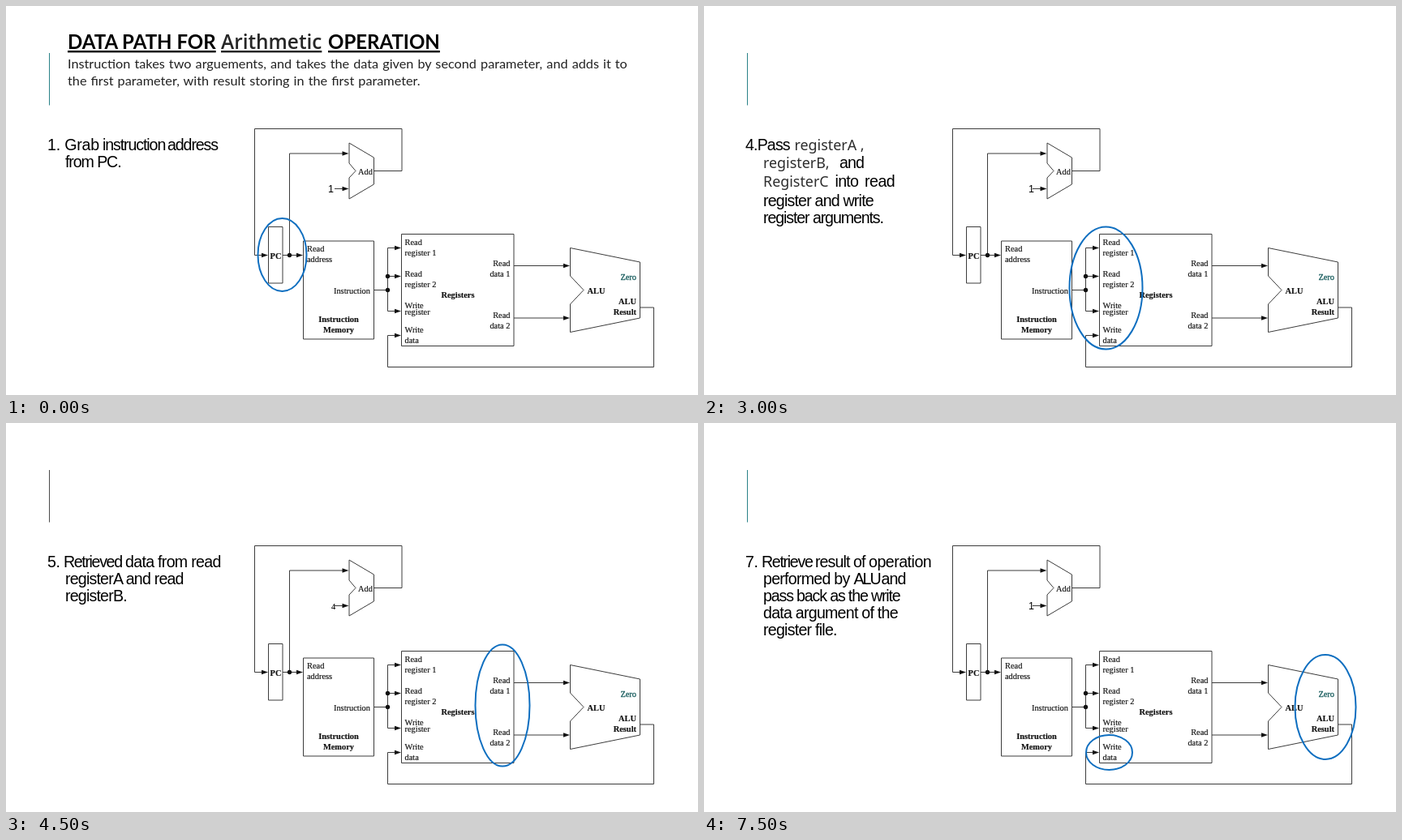
Animation of 853 by 480 pixels, one loop 8000 ms. Source, as an HTML page:

```html
<!DOCTYPE html>
<html lang="en">
<head>
<meta charset="utf-8">
<title>Arithmetic data path</title>
<style>
  html, body { margin: 0; width: 100%; height: 100%; overflow: hidden; background: #fff; }
  svg { display: block; width: 100vw; height: 100vh; }
  text { white-space: pre; }
  .wire { fill: none; stroke: #3c3c3c; stroke-width: 1; }
  .label { font: 10.4px "Liberation Serif", serif; fill: #111; stroke: #111; stroke-width: .15; }
  .bold { font-weight: bold; }
  .end { text-anchor: end; }
  .mid { text-anchor: middle; }
  .zero { fill: #1c5f60; stroke: #1c5f60; stroke-width: .3; }
  .step { font: 19.6px "Liberation Sans", sans-serif; fill: #000; }
  .code { font: 17.9px "Noto Sans", sans-serif; fill: #2e2e2e; }
  .title { font: bold 24px Lato, sans-serif; text-decoration: underline; }
  .keyword { font: 600 24.4px "Open Sans", sans-serif; fill: #262626; text-decoration: underline; }
  .intro { font: 16.25px Lato, sans-serif; word-spacing: .9px; fill: #222; }
  .count { font: 12.5px "Liberation Sans", sans-serif; }
  .ring { fill: none; stroke: #0f6fc0; stroke-width: 2; }
</style>
</head>
<body>
<svg viewBox="0 0 853 480" preserveAspectRatio="none">
  <path id="accent" d="M53.5 58V122.5" fill="none"/>
  <g id="diagram"></g>
  <g id="slide"></g>
</svg>
<script>
const STEP_MS = 1500, LOOP_MS = 8000;
const el = id => document.getElementById(id);

const text = (x, y, str, cls, spacing = 0) =>
  `<text x="${x}" y="${y}" class="${cls}" letter-spacing="${spacing}">${str}</text>`;
const label = (x, y, str, cls = '') => text(x, y, str, 'label ' + cls);
const wire = d => `<path class="wire" d="${d}"/>`;
const arrow = (x, y) => `<path d="M${x} ${y}l-8 -2.7v5.4z" fill="#111"/>`;
const dot = (x, y) => `<circle cx="${x}" cy="${y}" r="2.7" fill="#111"/>`;
const ring = (cx, cy, rx, ry) =>
  `<ellipse class="ring" cx="${cx}" cy="${cy}" rx="${rx}" ry="${ry}"/>`;
const say = (x, y, str, spacing) => text(x, y, str, 'step', spacing);
const code = (x, y, str) => text(x, y, str, 'code');
const increment = x => text(x, 230, '1', 'count');

el('diagram').innerHTML = [
  // Blocks
  'M323.5 272.5H341V342H323.5Z',
  'M366.5 290H453.5V411H366.5Z',
  'M487.5 281.5H626V419.5H487.5Z',
  'M423 169L453.5 187V220L423 238V212L431 203.5L423 194Z',
  'M695.5 298.5L781.5 316V385L695.5 402.5V368L712 350.5L695.5 333Z',
  // Connections
  'M453.5 203.5H488V151.5H306.5V307.5H320',
  'M341 307.5H362M349.5 307.5V182H418',
  'M405 225.5H418',
  'M453.5 350.5H470.5M483 298.5H470.5V376.5H483M470.5 333.5H483',
  'M626 320.5H690M626 385H690',
  'M781.5 372H798.5V445.5H470.5V406.5H483',
].map(wire).join('') +
  [[323, 307.5], [366, 307.5], [422.5, 182], [422.5, 225.5], [487, 298.5], [487, 333.5],
   [487, 376.5], [487, 406.5], [695, 320.5], [695, 385]].map(p => arrow(...p)).join('') +
  dot(349.5, 307.5) + dot(470.5, 333.5) + dot(470.5, 350.5) +
  label(332.5, 311.5, 'PC', 'bold mid') +
  label(434, 208, 'Add') +
  label(371, 303, 'Read') + label(371, 316, 'address') +
  label(449, 355, 'Instruction', 'end') +
  label(410, 389.5, 'Instruction', 'bold mid') + label(410, 402.5, 'Memory', 'bold mid') +
  label(491.5, 294.5, 'Read') + label(491.5, 307.5, 'register 1') +
  label(491.5, 333.5, 'Read') + label(491.5, 346.5, 'register 2') +
  label(491.5, 373, 'Write') + label(491.5, 381, 'register') +
  label(491.5, 402.5, 'Write') + label(491.5, 415.5, 'data') +
  label(557, 359.5, 'Registers', 'bold mid') +
  label(621.5, 320.5, 'Read', 'end') + label(621.5, 333.5, 'data 1', 'end') +
  label(621.5, 385, 'Read', 'end') + label(621.5, 398, 'data 2', 'end') +
  label(716.5, 355, 'ALU', 'bold') + label(777, 338, 'Zero', 'end zero') +
  label(777, 368, 'ALU', 'bold end') + label(777, 381, 'Result', 'bold end');

const slides = [
  text(76, 53, 'DATA PATH FOR', 'title') + text(265, 53, 'Arithmetic', 'keyword') +
  text(397, 53, 'OPERATION', 'title') +
  text(76, 77, 'Instruction takes two arguements, and takes the data given by second parameter, and adds it to', 'intro') +
  text(76, 98, 'the first parameter, with result storing in the first parameter.', 'intro') +
  say(51, 178, '1. Grab', -.2) + say(119, 178, 'instruction', -1.1) + say(199, 178, 'address', -1.1) +
  say(73, 199, 'from PC.', -1.1) +
  increment(397) + ring(340.5, 307, 30, 45),

  say(50, 212, '2.', -.5) + say(71.5, 212, 'Fetch instruction from', -1.34) +
  say(71.5, 233, 'instruction memory.', -1.35) +
  say(51, 266, '3.', -.5) + say(71.5, 266, 'Decode instruction.', -1.3) +
  increment(401) + ring(406, 346, 56.5, 69.5),

  say(51, 178, '4.Pass', -.85) + code(111.5, 178, 'registerA ,') +
  code(73, 200, 'registerB,') + say(167, 200, 'and', -.9) +
  code(73, 223, 'RegisterC') + say(161.5, 223, 'into', -.7) + say(198, 223, 'read', -.5) +
  say(73, 247, 'register and write', -.8) + say(73, 268, 'register arguments.', -1.1) +
  increment(400) + ring(495.5, 348, 45, 75.5),

  say(51, 178, '5.', -.5) + say(71, 178, 'Retrieved', -1.35) + say(147, 178, 'data from read', -.7) +
  say(73, 199, 'registerA and read', -.8) + say(73, 220, 'registerB.', -.8) +
  label(401, 229.5, '4') + ring(612, 348.5, 33.5, 75),

  say(51, 178, '6. Passed contents of', -.63) +
  code(73, 200, 'registerA') + say(160, 200, 'and', -.9) + code(198, 200, 'registerB') +
  say(73, 223, 'into the', -.95) + say(132.5, 223, 'ALU', -2) + say(166, 223, 'as', -.8) +
  say(191.5, 223, 'operands', -.85) +
  say(73, 244, 'of the', -.8) + say(123, 244, 'operation', -.65) + say(207.5, 244, 'to be', -.8) +
  say(73, 265, 'performed.', -.9) +
  increment(400) + ring(694, 347.5, 33.5, 75),

  say(51, 178, '7.', -.5) + say(71, 178, 'Retrieve', -1.3) + say(137, 178, 'result of', -.9) +
  say(203, 178, 'operation', -.5) +
  say(73, 199, 'performed by', -.75) + say(184.5, 199, 'ALU', -2) + say(218.5, 199, 'and', -.9) +
  say(73, 220, 'pass back as the write', -1.15) +
  say(73, 241, 'data argument of the', -.75) + say(73, 262, 'register file.', -.75) +
  increment(400) + ring(499.5, 406.5, 28.5, 21.5) + ring(766, 350.5, 37.5, 64.5),
];

let shown = -1;
function draw(now) {
  const index = Math.floor(now % LOOP_MS / STEP_MS);
  if (index !== shown) {
    shown = index;
    el('slide').innerHTML = slides[index];
    el('accent').setAttribute('stroke', index === 3 ? '#4a4a4a' : '#2a8288');
  }
}

const start = performance.now();
function tick() {
  draw(performance.now() - start);
  requestAnimationFrame(tick);
}
tick();
</script>
</body>
</html>
```
